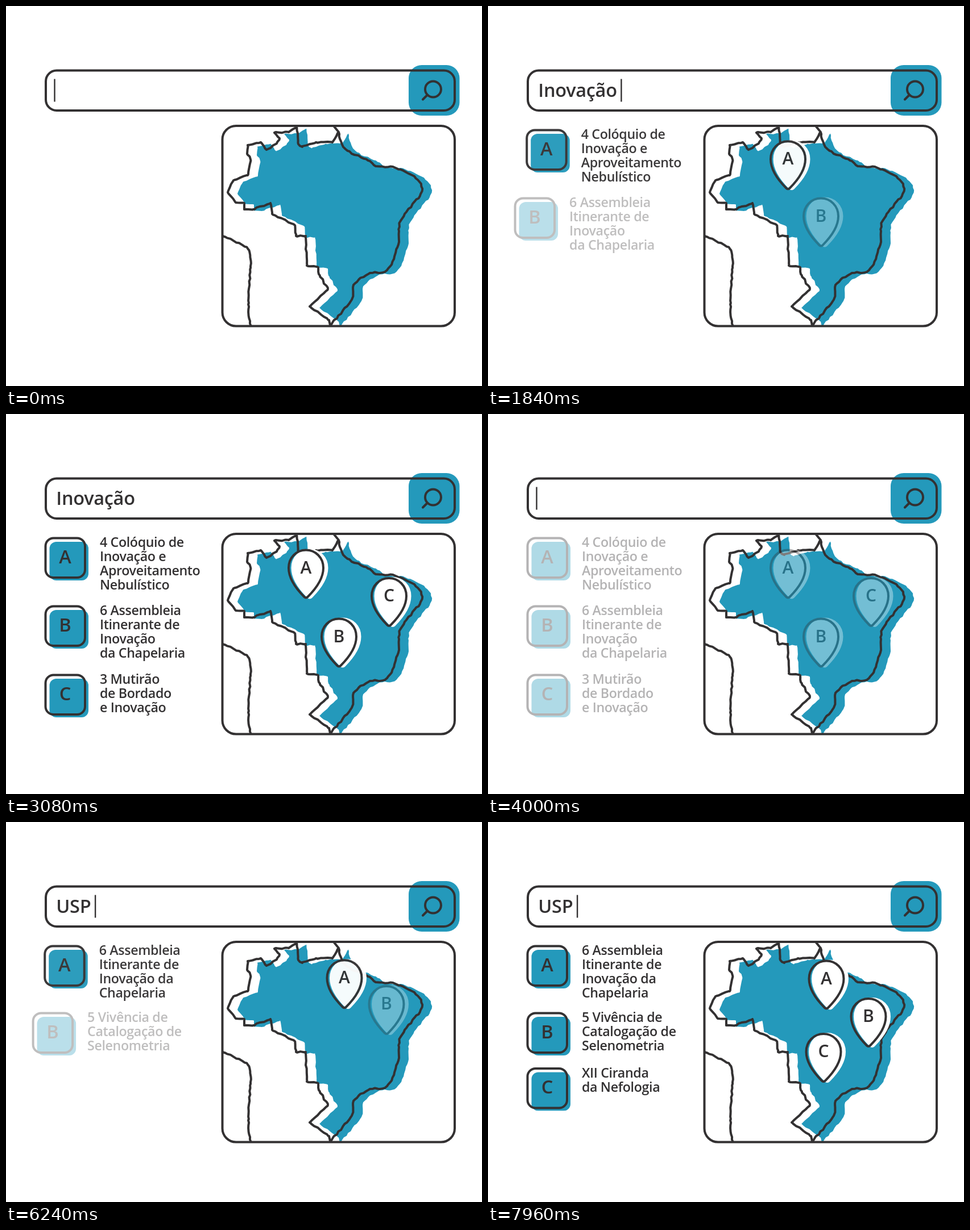
An HTML page for the animation above (8000 ms loop, 837x669 px).

```html
<!DOCTYPE html>
<html lang="pt-BR">
<head>
<meta charset="utf-8">
<title>Busca de eventos</title>
<style>
  html, body { margin: 0; width: 100%; height: 100%; overflow: hidden; background: #fff; }
  svg { display: block; width: 837px; height: 669px; font-family: "Open Sans", sans-serif; font-weight: 600; fill: #333132; }
  .line { fill: none; stroke: #333132; stroke-width: 4; stroke-linecap: round; stroke-linejoin: round; }
  .teal { fill: #2499bb; }
  .white { fill: #fff; stroke: #fff; stroke-width: 4; stroke-linejoin: round; }
  .query, .badge { font-size: 32.5px; }
  .query { letter-spacing: -.3px; }
  .label { font-size: 23.2px; letter-spacing: -.35px; }
  .mark { font-size: 30px; }
  .badge, .mark { text-anchor: middle; }

  .row { --from: translate(-32px, 0); }
  .pin { --from: translate(0, -32px); }
  .item { animation: enter 8s linear var(--start) infinite backwards; }
  .set0 { animation: first 8s linear infinite; }
  .set1 { animation: second 8s linear infinite; }

  @keyframes enter {
    0% { opacity: 0; transform: var(--from); }
    3.45%, 65% { opacity: 1; transform: translate(0, 0); }
    65.01%, 100% { opacity: 0; transform: translate(0, 0); }
  }
  @keyframes first {
    0%, 47.825% { opacity: 1; }
    51.275%, 99.99% { opacity: 0; }
    100% { opacity: 1; }
  }
  @keyframes second {
    0%, 60% { opacity: 0; }
    60.01%, 100% { opacity: 1; }
  }
</style>
</head>
<body>
<svg viewBox="0 0 837 669">
  <defs>
    <clipPath id="frame"><rect x="381" y="211" width="408" height="352" rx="24"/></clipPath>
    <path id="drop" d="M0-31.5C17-31.5 30.5-18 30.5 0C30.5 20 14 40 3 51Q0 54-3 51C-14 40-30.5 20-30.5 0C-30.5-18-17-31.5 0-31.5Z"/>
  </defs>

  <rect class="teal" x="708" y="104" width="89.5" height="89" rx="23"/>
  <rect class="line" x="70" y="113.5" width="719" height="70.5" rx="19"/>
  <circle class="line" cx="751" cy="146.5" r="14"/>
  <path class="line" d="M741 156.5L733 164.5"/>
  <text class="query" id="query" x="88.3" y="160"></text>
  <rect id="caret" y="128.5" width="2.4" height="40"/>

  <g clip-path="url(#frame)">
    <path id="land" class="teal" transform="translate(17 2.5)"/>
    <path id="border" class="line"/>
  </g>
  <rect class="line" x="380.5" y="211" width="408.5" height="352.5" rx="24"/>
  <g id="results"></g>
</svg>
<script>
const $ = id => document.getElementById(id);

// Key points of the map; the detail between them is generated
const north = [425,262, 425,245, 448,240, 458,253, 476,242, 481,233, 472,223, 497,222, 511,213,
  514,243, 521,248, 545,240, 574,240, 585,222];
const coast = [585,222, 597,252, 640,273, 650,282, 685,285, 724,306, 729,331, 694,378, 690,420,
  670,465, 640,470, 611,491, 608,517, 570,562];
const west = [568,553, 534,529, 566,498, 550,472, 549,460, 529,457, 527,405, 510,405, 507,385, 468,366,
  465,347, 435,358, 419,358, 419,347, 404,346, 390,328, 400,307, 425,298, 430,270, 425,262];
const pacific = [380,404, 425,427, 430,458, 426,525, 430,565];

let seed = 7;
const random = () => (seed = seed * 16807 % 2147483647) / 2147483647;

// Ragged Hermite curve: bend 0 gives straight segments, 0.5 a smooth line
function trace(flat, bend) {
  const at = i => {
    const k = 2 * Math.max(0, Math.min(flat.length / 2 - 1, i));
    return [flat[k], flat[k + 1]];
  };
  const out = [at(0)];
  for (let i = 1; i < flat.length / 2; i++) {
    const [p, a, b, q] = [at(i - 2), at(i - 1), at(i), at(i + 1)];
    const n = Math.ceil(Math.hypot(b[0] - a[0], b[1] - a[1]) / 5);
    for (let k = 1; k <= n; k++) {
      const u = k / n, s = u * u * (3 - 2 * u), rough = k < n ? 2 : 0;
      out.push([0, 1].map(c => a[c] + (b[c] - a[c]) * s
        + bend * (b[c] - p[c]) * u * (1 - u) ** 2
        - bend * (q[c] - a[c]) * u * u * (1 - u)
        + (random() - 0.5) * rough));
    }
  }
  return out.map(point => point.map(v => v.toFixed(1)).join(" ")).join("L");
}

const outline = `M${trace(north, 0)}L${trace(coast, 0.5)}L${trace(west, 0)}Z`;
$("land").setAttribute("d", outline);
$("border").setAttribute("d", `${outline}M${trace(pacific, 0.3)}M576 211L585 222`);

// Result sets: row offset, label lines, pin centre
const sets = [
  { start: 1576, items: [
    [0, ["4 Colóquio de", "Inovação e", "Aproveitamento", "Nebulístico"], 527.5, 271],
    [120, ["6 Assembleia", "Itinerante de", "Inovação", "da Chapelaria"], 585.5, 392],
    [241, ["3 Mutirão", "de Bordado", "e Inovação"], 673.5, 320.5]] },
  { start: 5976, items: [
    [0, ["6 Assembleia", "Itinerante de", "Inovação da", "Chapelaria"], 595, 276],
    [118, ["5 Vivência de", "Catalogação de", "Selenometria"], 669, 342.5],
    [215.5, ["XII Ciranda", "da Nefologia"], 590, 404.5]] }
];

const row = (letter, lines) => `
  <rect class="teal" x="76.5" y="225" width="68.5" height="68" rx="12"/>
  <rect class="line" x="69.5" y="218.5" width="69.5" height="69.5" rx="14"/>
  <text class="badge" x="104" y="262.5">${letter}</text>
  ${lines.map((s, i) => `<text class="label" x="165" y="${234 + i * 25}">${s}</text>`).join("")}`;

const pin = letter => `
  <use href="#drop" class="white" x="6.5"/>
  <use href="#drop" class="line"/>
  <text class="mark" y="9.5">${letter}</text>`;

$("results").innerHTML = sets.map(({ start, items }, n) =>
  `<g class="set${n}">` + items.map(([y, lines, px, py], i) => {
    const letter = "ABC"[i], style = `style="--start:${start + i * 178}ms"`;
    return `<g transform="translate(0 ${y})"><g class="item row" ${style}>${row(letter, lines)}</g></g>
      <g transform="translate(${px} ${py})"><g class="item pin" ${style}>${pin(letter)}</g></g>`;
  }).join("") + "</g>").join("");

// Typing: each phase waits, edits the query key by key, then idles
const LOOP = 8000, BLINK = 480;
const phases = [
  { from: 0, at: 1000, every: 80, word: "Inovação" },
  { from: 3520, at: 3520, every: 35, word: "Inovação", erase: true },
  { from: 5760, at: 5800, every: 80, word: "USP" }
];

function search(t) {
  const { from, at, every, word, erase } = phases.findLast(p => t >= p.from);
  const size = word.length, end = at + every * size;
  const keys = t < at ? 0 : Math.min(size, Math.floor((t - at) / every) + 1);
  const idle = t < at ? t - from : Math.max(0, t - end);
  return {
    text: word.slice(0, erase ? size - keys : keys),
    lit: idle % (2 * BLINK) < BLINK
  };
}

let begin = null;
function draw(now) {
  begin ??= now;
  const { text, lit } = search((now - begin) % LOOP);
  const query = $("query"), caret = $("caret");
  if (query.textContent !== text) query.textContent = text;
  caret.setAttribute("x", text ? 94.8 + query.getComputedTextLength() : 84.3);
  caret.style.opacity = lit ? 1 : 0;
  requestAnimationFrame(draw);
}
requestAnimationFrame(draw);
</script>
</body>
</html>
```
